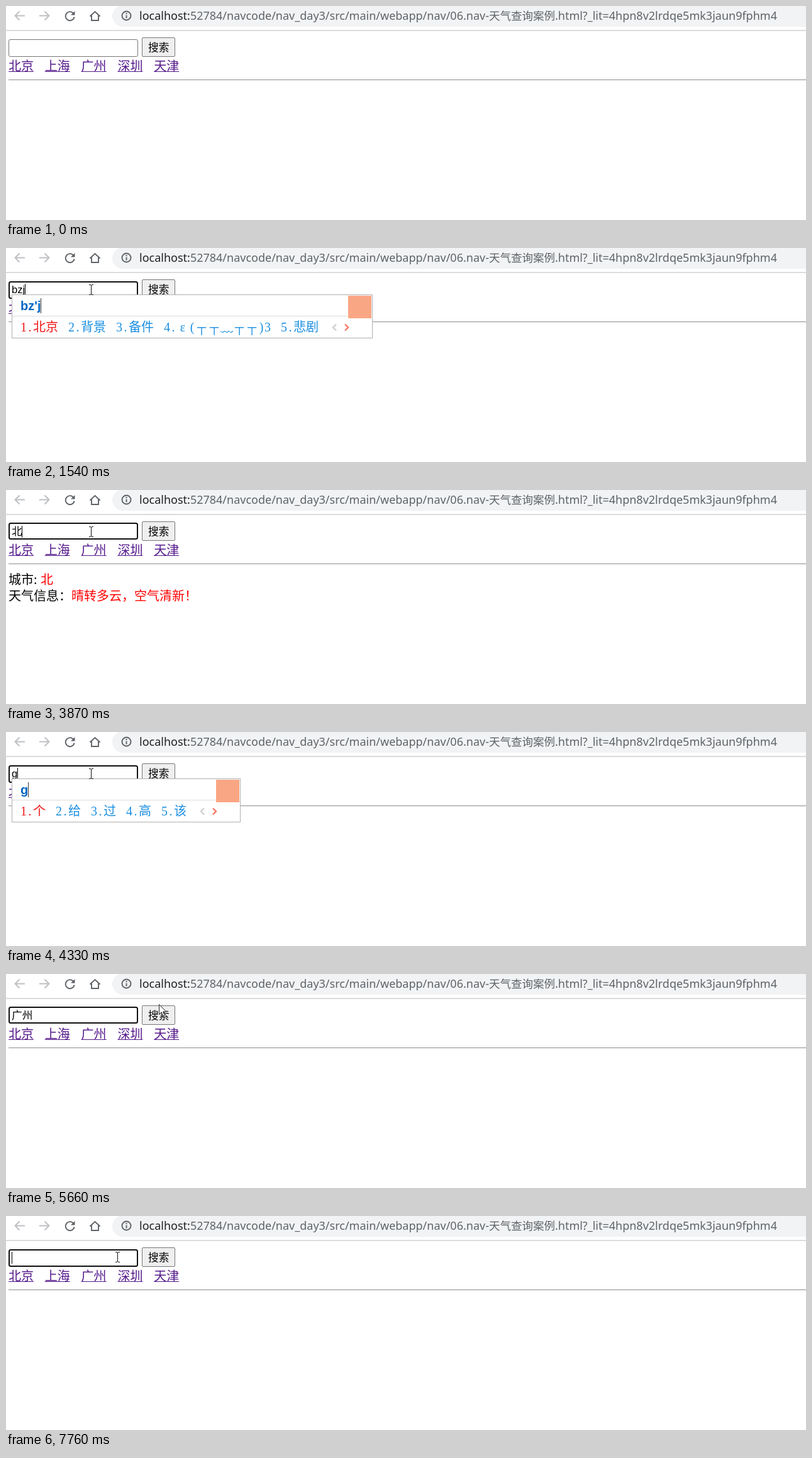
Recreate the animation shown at these times as an HTML page. Size 1272x341 px, loop 8 s.

```html
<!DOCTYPE html>
<html lang="zh-CN">
<head>
<meta charset="utf-8">
<style>
  html, body { margin: 0; width: 100%; height: 100%; overflow: hidden; background: #fff; }
  svg { display: block; }
  text { font-family: "Noto Sans CJK SC", "Noto Sans CJK", sans-serif; font-size: 20px; white-space: pre; }
  .url { font-family: "Noto Sans", "Noto Sans CJK SC", sans-serif; font-size: 18px; fill: #5f6368; }
  .field { font-family: "Liberation Sans", "Noto Sans CJK SC", sans-serif; font-size: 16.67px; }
  .pinyin { font: bold 20px "Liberation Sans", sans-serif; fill: #0066c4; }
  .cell { font-family: "Liberation Serif", "Noto Sans CJK SC", serif; text-anchor: middle; }
  .icon { fill: none; stroke: #5f6368; stroke-width: 1.9; }
</style>
</head>
<body>
<svg width="1272" height="341" viewBox="0 0 1272 341">
  <g class="icon">
    <path d="M30 15.5H14.5M21.5 8.5l-7 7l7 7M53 15.5h15.5M61.5 8.5l7 7l-7 7" stroke="#bdbfc2"/>
    <path d="M107.5 12.2A7 7 0 1 0 108.6 17.5"/>
    <path d="M109.5 8v6.5h-6.5z" fill="#5f6368" stroke="none"/>
    <path d="M133.5 16.5l8-7.5l8 7.5M136 15v8h11v-8"/>
  </g>
  <rect x="169" y="-1" width="1140" height="34" rx="17" fill="#f1f3f4"/>
  <circle class="icon" cx="191.5" cy="15.5" r="7"/>
  <path class="icon" d="M191.5 14.5v5M191.5 11v2"/>
  <text class="url" x="212" y="22"><tspan fill="#202124">localhost:</tspan>52784/navcode/nav_day3/src/main/webapp/nav/06.nav-<tspan font-size="17.5">天气查询案例</tspan>.html?_lit=4hpn8v2lrdqe5mk3jaun9fphm4</text>
  <rect y="38" width="1272" height="2" fill="#dcdcdc"/>
  <g id="links"></g>
  <rect x="4" y="117" width="1268" height="1" fill="#9a9a9a"/>
  <rect x="4" y="118" width="1268" height="1" fill="#eee"/>
  <g id="live"></g>
</svg>
<script>
const LOOP = 8000, STEP = 77;
const $ = id => document.getElementById(id);
const pen = document.createElement('canvas').getContext('2d');

const weather = { 北: '晴转多云，空气清新！', 广: '局部地区大风，空气也算不错！' };

// raised: the field sits a pixel higher once it has held Chinese text
const states = [
  { at: 0, text: '' },
  { at: 1320, text: 'b', words: '不 吧 把 被 比' },
  { at: 1390, text: 'bz', words: '不 把 变 别 班' },
  { at: 1540, text: 'bzj', pinyin: "bz'j", words: '北京 背景 备件 ε(┬┬﹏┬┬)3 悲剧' },
  { at: 1790, text: '北京', raised: true },
  { at: 2320, text: '北京', raised: true, city: '北京' },
  { at: 3870, text: '北', raised: true, city: '北' },
  { at: 3950, text: '', raised: true },
  { at: 4030, text: '' },
  { at: 4330, text: 'g', words: '个 给 过 高 该' },
  { at: 4500, text: 'gu', words: '古 顾 故 股 骨' },
  { at: 4730, text: 'guz', pinyin: "gu'z", words: '广州 贵州 骨折 固执 构造' },
  { at: 5030, text: '广州', raised: true },
  { at: 5890, text: '广州', raised: true, city: '广州' },
  { at: 7230, text: '广', raised: true, city: '广' },
  { at: 7300, text: '', raised: true },
  { at: 7510, text: '' }
];
const focusSpans = [[610, 5890], [6670, LOOP]];
const caretSpans = [[610, 1140], [1320, 2320], [2860, 3410], [3870, 5560], [6670, 7510], [7760, LOOP]];
const pointerPath = [
  [70, 400, 224], [610, 150, 74], [840, 135, 66], [5340, 135, 66], [5660, 243, 48],
  [5740, 243, 62], [6200, 243, 62], [6280, 192, 65], [6440, 178, 65], [6820, 177, 65]
];

const within = (spans, t) => spans.some(([from, to]) => t >= from && t < to);
const text = (x, y, str, attrs = '') => `<text x="${x}" y="${y}" ${attrs}>${str}</text>`;
const line = (d, color, width = 1) => `<path d="${d}" fill="none" stroke="${color}" stroke-width="${width}"/>`;
function textWidth(str, font) {
  pen.font = font;
  return pen.measureText(str).width;
}

function pointerAt(t) {
  const next = pointerPath.findIndex(p => p[0] > t);
  if (next === 0) return null;
  if (next < 0) return pointerPath.at(-1).slice(1);
  const [t0, x0, y0] = pointerPath[next - 1], [t1, x1, y1] = pointerPath[next];
  const u = Math.floor((t - t0) / STEP) * STEP / (t1 - t0);
  return [x0 + (x1 - x0) * u, y0 + (y1 - y0) * u].map(Math.round);
}

function field(state, t) {
  const focused = within(focusSpans, t), inset = focused ? 1 : 0.5;
  const top = state.raised ? 52 : 53, height = state.raised ? 27 : 28;
  const caretX = Math.floor(9 + textWidth(state.text, '16.67px "Liberation Sans", "Noto Sans CJK SC", sans-serif')) + 0.5;
  return `<rect x="${4 + inset}" y="${top + inset}" width="${206 - 2 * inset}" height="${height - 2 * inset}" rx="2.5"
      fill="#fff" stroke="${focused ? '#101010' : '#767676'}" stroke-width="${2 * inset}"/>`
    + text(9, 72, state.text, 'class="field"')
    + (within(caretSpans, t) ? line(`M${caretX} 57V76`, '#000') : '');
}

function button(pointer) {
  const hover = pointer && pointer[0] > 216 && pointer[0] < 269 && pointer[1] > 50 && pointer[1] < 81;
  return `<rect x="216.5" y="50.5" width="52" height="30" rx="1.5" fill="${hover ? '#e5e5e5' : '#efefef'}" stroke="#767676"/>`
    + text(242.7, 72, '搜索', 'class="field" text-anchor="middle"');
}

function result(city) {
  return text(4, 150, '城市:') + text(55, 150, city, 'fill="red"')
    + text(4, 176, '天气信息：') + text(104, 176, weather[city[0]], 'fill="red"');
}

function candidateWindow(state) {
  let x = 23, items = '';
  state.words.split(' ').forEach((word, i) => {
    // ASCII takes a half-width cell, everything else a full one
    for (const ch of `${i + 1}.${word}`) {
      const cell = ch < '\x7f' ? 10 : 20;
      items += text(x + cell / 2, 132.5, ch, `class="cell" fill="${i ? '#1b8fe0' : '#f01818'}"`);
      x += cell;
    }
    x += 16;
  });
  const end = x - 16, right = end + 86;
  const pinyin = state.pinyin || state.text;
  const caretX = Math.floor(23 + textWidth(pinyin, 'bold 20px "Liberation Sans", sans-serif')) + 0.5;
  return `<rect x="9.5" y="74.5" width="${right - 10}" height="69" fill="#fff" stroke="#b0b0b0"/>`
    + line(`M10 108.5H${right - 40}`, '#dcdcdc')
    + text(23, 99, pinyin, 'class="pinyin"') + line(`M${caretX} 80V104`, '#333') + items
    + line(`M${end + 28} 121.5l-5 5l5 5`, '#d0d0d0', 2.4)
    + line(`M${end + 42} 121.5l5 5l-5 5`, '#f87866', 2.4)
    + `<rect x="${right - 39}" y="76" width="37" height="36" fill="#f9a684"/>`;
}

function pointerShape([x, y]) {
  const overField = x < 210 && y > 52 && y < 80;
  const shape = overField
    ? line('M-3 -7.5h2l1.5 1l1.5 -1h2M.5 -7V8M-3 8.5h2l1.5 -1l1.5 1h2', '#111')
    : '<path d="M.5 .5V16.5l3.7-3.5l2.6 6l2.5-1l-2.6-6h5z" fill="#fff" stroke="#222"/>';
  return `<g transform="translate(${x} ${y})">${shape}</g>`;
}

function render(t) {
  const state = states.findLast(s => s.at <= t);
  const pointer = pointerAt(t);
  return field(state, t) + button(pointer)
    + (state.city ? result(state.city) : '')
    + (state.words ? candidateWindow(state) : '')
    + (pointer ? pointerShape(pointer) : '');
}

$('links').innerHTML = ['北京', '上海', '广州', '深圳', '天津'].map((name, i) => {
  const x = 4 + i * 57.8;
  return text(x, 102.5, name, 'fill="#551a8b"') + line(`M${x} 104.5h40`, '#551a8b', 1.2);
}).join('');

let shown = '';
function frame() {
  const markup = render(performance.now() % LOOP);
  if (markup !== shown) $('live').innerHTML = shown = markup;
  requestAnimationFrame(frame);
}
frame();
</script>
</body>
</html>
```
